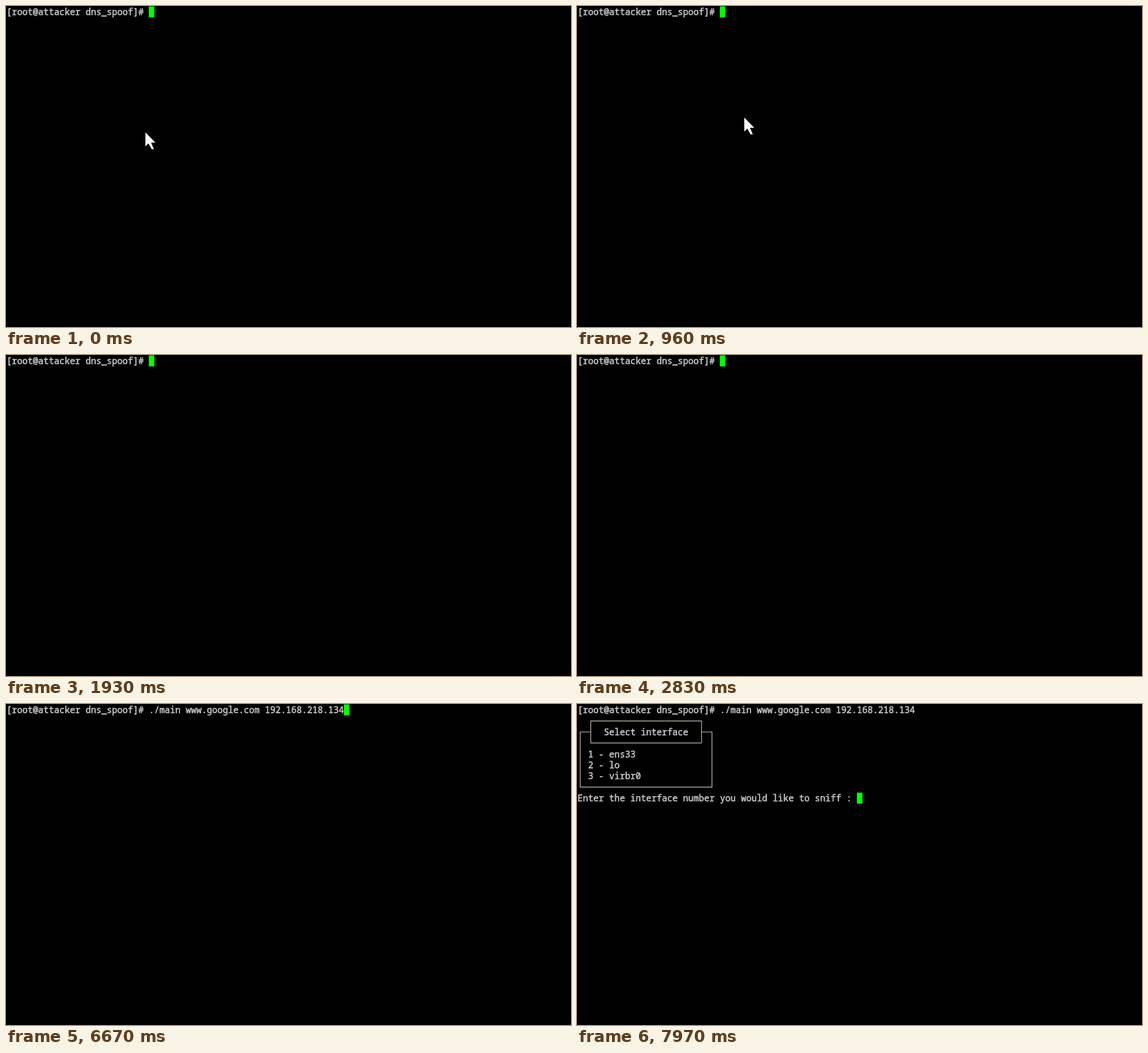
Recreate the animation shown at these times as an HTML page with a canvas. Size 993 px wide and 564 px high, loop 8000 ms.

```html
<!DOCTYPE html>
<html lang="en">
<head>
<meta charset="utf-8">
<title>Terminal session</title>
<style>
  html, body { margin: 0; width: 100%; height: 100%; overflow: hidden; background: #000; }
  canvas { display: block; }
</style>
</head>
<body>
<canvas id="stage" width="993" height="564"></canvas>
<script>
const canvas = document.getElementById('stage');
const ctx = canvas.getContext('2d');
const LOOP = 8000;
const CELL_W = 9.266, CELL_H = 19.38;

const PROMPT = '[root@attacker dns_spoof]# ';
const COMMAND = './main www.google.com 192.168.218.134';
const QUESTION = 'Enter the interface number you would like to sniff : ';
const INTERFACES = ['ens33', 'lo', 'virbr0'];
const MENU_ROWS = 8;
const ARROW = new Path2D('M0 0V24.5L5.5 19.5 11 29.5H15L10 18H17.5Z');

const colX = col => 1 + col * CELL_W;
const rowY = row => 0.7 + row * CELL_H;
const progress = (t, from, to) => Math.min(1, Math.max(0, (t - from) / (to - from)));

function print(row, col, text) {
  [...text].forEach((char, i) => {
    const x = colX(col + i), y = rowY(row) + 15.3;
    ctx.fillText(char, x, y);
    ctx.strokeText(char, x, y);
  });
}

function drawCursor(row, col) {
  ctx.fillStyle = '#00ff00';
  ctx.fillRect(colX(col) - 0.2, rowY(row), CELL_W + 0.5, CELL_H);
}

// A box whose edges run through the centres of its corner cells.
function frame(top, left, bottom, right) {
  const x = colX(left + 0.5), y = rowY(top + 0.5);
  const box = [x, y, (right - left) * CELL_W, (bottom - top) * CELL_H];
  ctx.clearRect(...box);
  ctx.strokeRect(...box);
}

// Only the first rows of the menu show while it is being printed.
function drawMenu(rows) {
  ctx.save();
  ctx.beginPath();
  ctx.rect(0, 0, canvas.width, rowY(rows + 1));
  ctx.clip();
  ctx.save();
  ctx.strokeStyle = '#b0ae9e';
  ctx.lineWidth = 1.4;
  frame(2, 0, 7, 25);
  frame(1, 2, 3, 23);
  ctx.restore();
  print(2, 5, 'Select interface');
  INTERFACES.forEach((name, i) => print(4 + i, 2, `${i + 1} - ${name}`));
  print(MENU_ROWS, 0, QUESTION);
  ctx.restore();
}

// A slow drift up to the right, then an accelerating sweep.
function drawPointer(t) {
  const drift = progress(t, 30, 960);
  const sweep = progress(t, 960, 1330);
  const x = 245 + 49 * drift + 187 * sweep ** 2.8;
  const y = 222 - 26 * drift + 12.5 * (1 - (1 - sweep) ** 2);
  ctx.save();
  ctx.translate(Math.round(x), Math.round(y));
  ctx.fillStyle = '#fff';
  ctx.fill(ARROW);
  ctx.restore();
}

function typedAt(t) {
  if (t < 5300) return '';
  return t < 5740 ? 'clear' : COMMAND;
}

function draw(t) {
  ctx.clearRect(0, 0, canvas.width, canvas.height);
  ctx.font = '15.44px "Noto Sans Mono", "DejaVu Sans Mono", monospace';
  ctx.fillStyle = ctx.strokeStyle = '#c4c4c4';
  ctx.lineWidth = 0.6;
  ctx.lineJoin = 'round';

  const line = PROMPT + typedAt(t);
  print(0, 0, line);
  if (t < 6970) {
    drawCursor(0, line.length);
  } else {
    const rows = t < 7640 ? 0 : 1 + Math.floor(progress(t, 7640, 7969) * (MENU_ROWS - 1));
    const done = rows === MENU_ROWS;
    if (rows) drawMenu(rows);
    drawCursor(done ? rows : rows + 1, done ? QUESTION.length : 0);
  }
  if (t < 1500) drawPointer(t);
}

let start;
function tick(now) {
  start ??= now;
  draw((now - start) % LOOP);
  requestAnimationFrame(tick);
}
draw(0);
requestAnimationFrame(tick);
</script>
</body>
</html>
```
